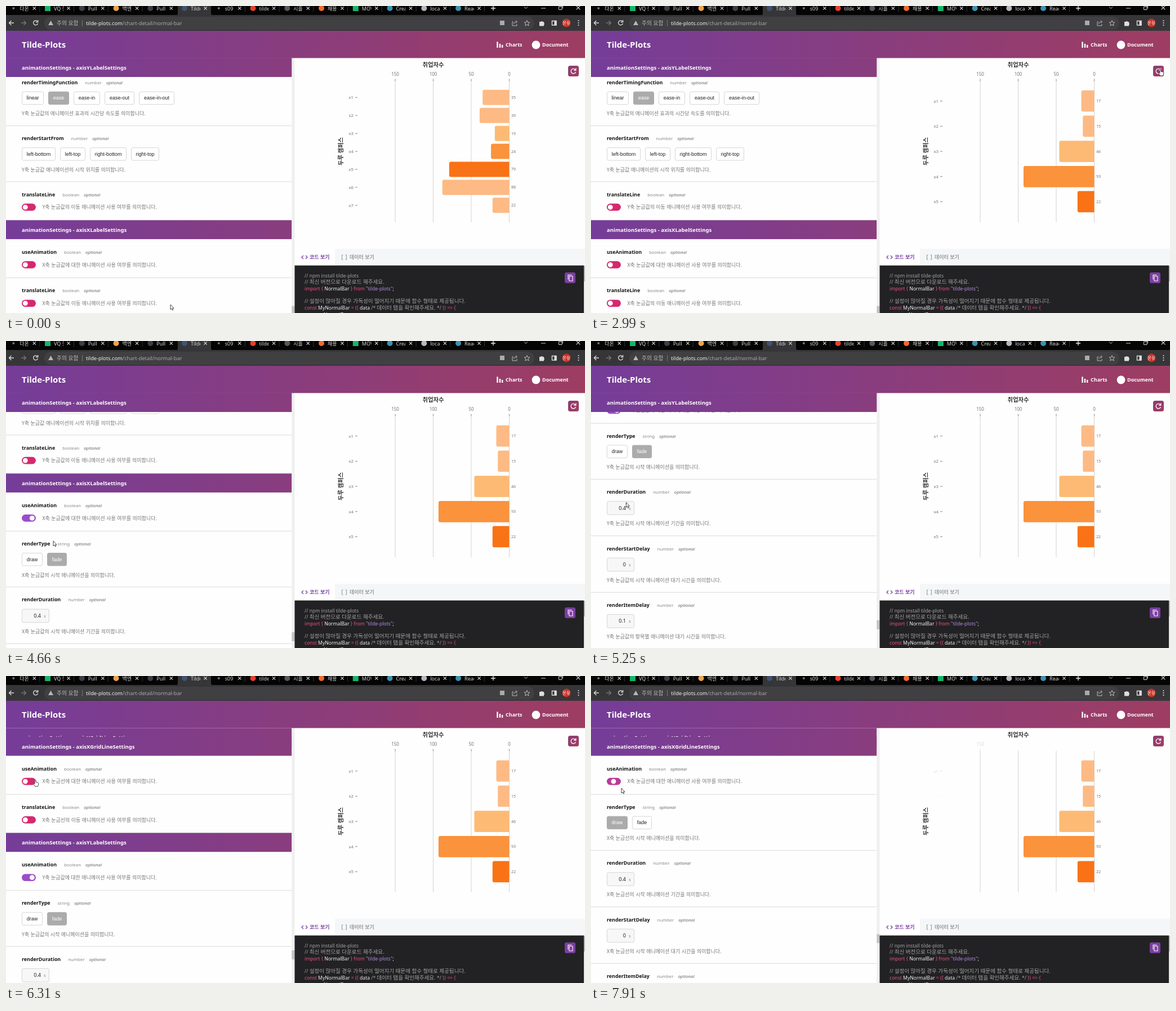
These frames come from a looping animation (1028 px wide and 545 px high, 7.99 s). An HTML page:

```html
<!DOCTYPE html>
<html lang="ko">
<head>
<meta charset="utf-8">
<title>Chart settings</title>
<style>
html, body { margin: 0; width: 100%; height: 100%; overflow: hidden; background: #fff; }
svg { display: block; width: 1028px; height: 545px; }
text { font-family: "Noto Sans", "Noto Sans CJK KR", "Noto Sans CJK", sans-serif; font-size: 9px; white-space: pre; }
.bold { font-weight: 700; }
.head { font-size: 9.52px; font-weight: 700; fill: #fff; }
.label { font-size: 8.87px; font-weight: 700; fill: #151515; }
.type { font-size: 7.85px; font-weight: 400; fill: #888; }
.opt { font-size: 7.85px; font-weight: 400; font-style: italic; fill: #666; }
.desc { font-family: "Noto Sans CJK KR", "Noto Sans CJK", sans-serif; font-size: 8.95px; fill: #777; }
.btn { font-family: "Liberation Sans", Arial, sans-serif; text-anchor: middle; fill: #222; }
.code { font-size: 8.6px; fill: #eee; }
.ko { font-size: 9.55px; }
.tick { font-size: 8px; fill: #777; }
.small { font-size: 7.2px; fill: #777; }
</style>
</head>
<body>
<svg id="stage" viewBox="0 0 1028 545">
  <defs>
    <linearGradient id="brand" gradientUnits="userSpaceOnUse" x1="0" y1="0" x2="1028" y2="0">
      <stop stop-color="#753d99"/><stop offset="1" stop-color="#9e3d62"/>
    </linearGradient>
    <linearGradient id="refresh" x2="1" y2="1">
      <stop stop-color="#8a3d74"/><stop offset="1" stop-color="#a53d5c"/>
    </linearGradient>
    <clipPath id="panelClip"><rect y="92" width="508" height="453"/></clipPath>
  </defs>
</svg>
<script>
const DURATION = 7990;
const stage = document.getElementById('stage');

function el(parent, tag, attrs = {}) {
  const node = document.createElementNS('http://www.w3.org/2000/svg', tag);
  for (const key in attrs) node.setAttribute(key, attrs[key]);
  return parent.appendChild(node);
}
const group = (parent, attrs) => el(parent, 'g', attrs);
const rect = (parent, x, y, width, height, fill, more) =>
  el(parent, 'rect', { x, y, width, height, fill, ...more });
const circle = (parent, cx, cy, r, fill, more) => el(parent, 'circle', { cx, cy, r, fill, ...more });
const path = (parent, d, stroke, width = 1, more) =>
  el(parent, 'path', { d, stroke, 'stroke-width': width, fill: 'none', ...more });
function text(parent, x, y, content, cls, more) {
  const node = el(parent, 'text', { x, y, class: cls, ...more });
  node.textContent = content;
  return node;
}
function span(parent, content, cls, more) {
  const node = el(parent, 'tspan', { class: cls, ...more });
  node.textContent = content;
}

const clamp = v => Math.max(0, Math.min(1, v));
const smooth = v => v * v * (3 - 2 * v);

// Eased values between keys of the form [time, value, value, ...]
function sample(keys, t) {
  let i = 0;
  while (i < keys.length - 1 && keys[i + 1][0] <= t) i++;
  const a = keys[i], b = keys[i + 1] || a;
  const k = a === b ? 0 : smooth(clamp((t - a[0]) / (b[0] - a[0])));
  return a.map((v, n) => typeof v === 'number' ? v + (b[n] - v) * k : v);
}

// ---------- browser frame ----------
function drawBrowser() {
  rect(stage, 0, 0, 1028, 17, '#050505');
  rect(stage, 0, 16, 1028, 28, '#363638');
  path(stage, 'M303 17 Q305 16 305 12 V0 H364 V12 Q364 16 367 17 Z', 'none', 0, { fill: '#363638' });
  const tabs = [
    ['#777', '다온', 2], ['#12b76a', 'VQ 등'], ['#3a3f45', 'Pull'], ['#f0a24a', '백엔'], ['#3a3f45', 'Pull'],
    ['#3f5374', 'Tilde'], ['#777', 's09', 2], ['#e8402a', 'tilde'], ['#55585f', '시흘'], ['#f06a2a', '채용'],
    ['#12b76a', 'MOV'], ['#3b93b0', 'Crea'], ['#b5b8bc', 'loca'], ['#3b93b0', 'Reac']
  ];
  tabs.forEach(([color, name, r = 5], i) => {
    const x = 13.3 + i * 60.75;
    if (color === '#12b76a') rect(stage, x - 5, -1, 10, 10, color);
    else circle(stage, x, 4, r, color);
    text(stage, x + 11, 7.5, name, '', { fill: '#d5d5d5' });
    rect(stage, x + 28, 0, 6, 12, i === 5 ? '#363638' : '#050505');
    cross(x + 37, 4, 2.6);
    if (i < 4 || i > 5) rect(stage, x + 46, 0, 1, 10, '#333');
  });
  path(stage, 'M861 4 H869 M865 0 V8', '#eee', 1.3);
  path(stage, 'M920 1.5 L923 4.5 L926 1.5', '#ccc');
  path(stage, 'M950 4 H958 M981.5 1 H987 V6.5 H981.5 Z M983.5 0 H988.5 V4.5', '#ccc');
  cross(1016, 3, 3.4);

  path(stage, 'M14 30 H5.5 M9.5 26 L5.5 30 L9.5 34', '#ddd', 1.3);
  path(stage, 'M27 30 H35.5 M31.5 26 L35.5 30 L31.5 34', '#777', 1.3);
  path(stage, 'M55.5 27 A4 4 0 1 0 56.5 31 M56.7 25 V28.5 H53', '#ddd', 1.3);
  rect(stage, 68, 19, 870, 23, '#404043', { rx: 11.5 });
  path(stage, 'M79.5 26 L84 34 H75 Z', 'none', 0, { fill: '#b8b8b8' });
  text(stage, 90, 33.5, '주의 요함', '', { fill: '#b8b8b8', style: 'font-size:9.8px' });
  rect(stage, 135, 25, 1, 11, '#777');
  const url = text(stage, 142, 33.5, '', '', { style: 'font-size:9.28px' });
  span(url, 'tilde-plots.com', '', { fill: '#f0f0f0' });
  span(url, '/chart-detail/normal-bar', '', { fill: '#a8a8a8' });
  rect(stage, 877, 26, 8, 8, '#a9abad');
  path(stage, 'M901 28 H899 V35 H907 V32 M901.5 32 Q902 28 907 28 M905 25.5 L907.5 28 L905 30.5', '#bbb');
  path(stage, 'M925 25.5 L926.4 28.9 L930 29.1 L927.2 31.4 L928.2 35 L925 33 L921.8 35 L922.8 31.4 L920 29.1 L923.6 28.9 Z', '#bbb');
  path(stage, 'M947 28 H949.5 A2 2 0 0 1 953 28 H955 V30 A2 2 0 0 1 955 33.5 V35.5 H947 Z', 'none', 0, { fill: '#ddd' });
  path(stage, 'M969.5 26.5 H977 V34 H969.5 Z', '#ddd', 1.4);
  rect(stage, 973.5, 26, 4, 8.5, '#ddd');
  circle(stage, 995, 30, 7.5, '#c83228');
  text(stage, 995, 33, '온유', '', { fill: '#fff', 'text-anchor': 'middle', style: 'font-size:7.5px' });
  [26, 30, 34].forEach(y => circle(stage, 1016.5, y, 1.1, '#ddd'));

  rect(stage, 0, 44, 1028, 49, 'url(#brand)');
  text(stage, 28, 74, 'Tilde-Plots', 'bold', { fill: '#fff', style: 'font-size:15px' });
  path(stage, 'M872.5 63.5 V74 M877 67 V74 M881.2 69 V74', '#fff', 2.4);
  text(stage, 887, 71.5, 'Charts', 'bold', { fill: '#fff' });
  circle(stage, 941, 69, 7.4, '#fff');
  text(stage, 952, 71.5, 'Document', 'bold', { fill: '#fff' });
}
function cross(x, y, r) {
  path(stage, `M${x - r} ${y - r} L${x + r} ${y + r} M${x + r} ${y - r} L${x - r} ${y + r}`, '#ddd', 1.1);
}

// ---------- settings panel ----------
const PANEL_TOP = 92.4;
const rows = [];
const toggles = {};
let rowLayer, headLayer, thumb;

function header(name) {
  const g = group(headLayer);
  rect(g, 0, 0, 507.4, 33.6, 'url(#brand)');
  text(g, 28, 20.7, `animationSettings - ${name}Settings`, 'head');
  rows.push({ g, height: 34, sticky: true });
}
function row(name, type, height, section) {
  const g = group(rowLayer);
  const label = text(g, 28, 25.6, '', 'label');
  span(label, name);
  span(label, type, 'type', { dx: 13 });
  span(label, 'optional', 'opt', { dx: 8 });
  rect(g, 0, height - 0.6, 507.4, 1, '#dadada');
  rows.push({ g, height, section });
  return g;
}
function toggleRow(name, key, desc) {
  const g = row(name, 'boolean', 68.3);
  const track = rect(g, 28, 38.8, 25, 12.6, '#d6286f', { rx: 6.3 });
  const knob = circle(g, 34.3, 45.1, 4.4, '#fff');
  text(g, 64.5, 48.3, desc, 'desc');
  toggles[key] = { track, knob };
}
function choiceRow(name, type, options, selected, desc, section) {
  const g = row(name, type, 99.3, section);
  let x = 28.5;
  options.forEach(([option, width]) => {
    const on = option === selected;
    rect(g, x, 38.9, width - 1, 22.4, on ? '#ababab' : '#fff', { rx: 2.5, stroke: on ? '#ababab' : '#d6d6d6' });
    text(g, x + (width - 1) / 2, 53, option, 'btn', on ? { style: 'fill:#fff' } : {});
    x += width + 8;
  });
  text(g, 28, 81, desc, 'desc');
}
function numberRow(name, value, desc, section) {
  const g = row(name, 'number', 100.4, section);
  rect(g, 28.5, 39.2, 48, 23.6, '#f7f7f7', { rx: 2.5, stroke: '#d6d6d6' });
  text(g, 62, 54, value, '', { fill: '#222', 'text-anchor': 'end' });
  text(g, 67, 54, 's', 'type');
  text(g, 28, 81.8, desc, 'desc');
}
function section(axis, part, noun, renderType) {
  const key = axis + part, subject = `${axis}축 ${noun}`, end = ' 의미합니다.';
  header(`axis${key}`);
  toggleRow('useAnimation', key, `${subject}에 대한 애니메이션 사용 여부를${end}`);
  if (renderType) {
    choiceRow('renderType', 'string', [['draw', 37], ['fade', 35]], renderType, `${subject}의 시작 애니메이션을${end}`, key);
    numberRow('renderDuration', '0.4', `${subject}의 시작 애니메이션 기간을${end}`, key);
    numberRow('renderStartDelay', '0', `${subject}의 시작 애니메이션 대기 시간을${end}`, key);
    numberRow('renderItemDelay', '0.1', `${subject}의 항목별 애니메이션 대기 시간을${end}`, key);
    choiceRow('renderTimingFunction', 'number',
      [['linear', 39], ['ease', 37], ['ease-in', 47], ['ease-out', 53], ['ease-in-out', 63]],
      'ease', `${subject}의 애니메이션 효과의 시간당 속도를${end}`, key);
    choiceRow('renderStartFrom', 'number',
      [['left-bottom', 60], ['left-top', 45], ['right-bottom', 65], ['right-top', 50]],
      '', `${subject} 애니메이션의 시작 위치를${end}`, key);
  }
  toggleRow('translateLine', key + 'Move', `${subject}의 이동 애니메이션 사용 여부를${end}`);
}
function drawPanel() {
  rect(stage, 0, PANEL_TOP, 508, 453, '#fefefe');
  const panel = group(stage, { 'clip-path': 'url(#panelClip)' });
  rowLayer = group(panel);
  headLayer = group(panel);
  section('Y', 'GridLine', '눈금선');
  section('X', 'GridLine', '눈금선', 'draw');
  section('Y', 'Label', '눈금값', 'fade');
  section('X', 'Label', '눈금값', 'fade');
  rect(stage, 507.4, PANEL_TOP, 5.6, 453, '#efefef');
  thumb = rect(stage, 507.4, 0, 5.2, 16, '#c3c3c3');
}
function setToggle(key, k) {
  const { track, knob } = toggles[key];
  const mix = (a, b) => Math.round(a + (b - a) * k);
  track.setAttribute('fill', `rgb(${mix(214, 155)},${mix(40, 77)},${mix(111, 202)})`);
  knob.setAttribute('cx', 34.3 + 12 * k);
}

// ---------- chart and code ----------
const BAR_COLORS = ['#fdba84', '#fdba84', '#fdba74', '#fb923c', '#f97316', '#fdba84', '#fdba84'];
const DATASETS = [
  [35, 39, 19, 24, 79, 88, 22],
  [46, 46, 57, 62, 81, 31],
  [38, 27, 61, 74, 45],
  [17, 15, 46, 93, 22]
];
const charts = [], axisLabels = [];

function drawChart() {
  rect(stage, 512.5, PANEL_TOP, 515.5, 339, '#fefefe');
  text(stage, 758.5, 107.5, '취업자수', 'bold', { fill: '#333', 'text-anchor': 'middle', style: 'font-size:10.3px' });
  text(stage, 0, 0, '두루 캠퍼스', 'bold', {
    fill: '#333', 'text-anchor': 'middle', style: 'font-size:10.3px', transform: 'translate(598 258) rotate(-90)'
  });
  [150, 100, 50, 0].forEach((value, i) => {
    const x = 691 + i * 67.5;
    rect(stage, x - 0.5, 133, 1, 251, '#d3d3d3');
    const g = group(stage);
    text(g, x, 124.3, value, 'tick', { 'text-anchor': 'middle' });
    rect(g, x - 0.5, 129.5, 1, 4, '#888');
    axisLabels.push(g);
  });
  DATASETS.forEach(values => {
    const g = group(stage), pitch = 223.4 / values.length, labels = [];
    values.forEach((value, i) => {
      const y = 146.4 + pitch * (i + 0.5), h = pitch * 0.845, w = value * 1.35;
      path(g, `M893.5 ${y - h / 2} h${3 - w} q-3 0 -3 3 v${h - 6} q0 3 3 3 h${w - 3} Z`, 'none', 0, { fill: BAR_COLORS[i] });
      text(g, 897, y + 2.4, value, 'small');
      const label = group(g);
      text(label, 617, y + 3, `x${i + 1}`, 'small', { 'text-anchor': 'end', style: 'font-size:7.7px' });
      rect(label, 620, y - 0.5, 4, 1, '#888');
      labels.push(label);
    });
    charts.push({ g, labels });
  });
  rect(stage, 998, 106, 19, 19, 'url(#refresh)', { rx: 3.5 });
  path(stage, 'M1010.8 113 A4.3 4.3 0 1 0 1011.5 117 M1011.8 110.5 V114 H1008.3', '#fff', 1.3);
}
function drawCode() {
  rect(stage, 512.5, 431, 515.5, 30, '#f5f6f8');
  rect(stage, 512.5, 431, 71.5, 30, '#fff');
  path(stage, 'M528 443 L525 446 L528 449 M532 443 L535 446 L532 449', '#7b3fa0', 1.3);
  text(stage, 539, 449, '코드 보기', 'bold', { fill: '#7b3fa0' });
  path(stage, 'M598.5 442 H596.5 V450 H598.5 M602.5 442 H604.5 V450 H602.5', '#999', 1.1);
  text(stage, 610, 449, '데이터 보기', 'bold', { fill: '#999' });
  rect(stage, 512.5, 460.6, 513.5, 85, '#222224');
  rect(stage, 1026, 461, 2, 84, '#e8e8e8');
  rect(stage, 1026, 461, 2, 28, '#bbb');

  const pink = '#ee4f86', violet = '#b48be0', gray = '#a3a3a3';
  const line = (x, y, parts) => {
    const node = text(stage, x, y, '', 'code');
    parts.forEach(([s, fill, cls = '']) => span(node, s, cls, { style: `fill:${fill}` }));
  };
  line(530, 482, [['// npm install tilde-plots', gray]]);
  line(530, 493.3, [['// ', gray], ['최신 버전으로 다운로드 해주세요.', gray, 'ko']]);
  line(530, 504.6, [['import', pink], [' { ', pink], ['NormalBar', '#eee'], [' } ', pink], ['from ', pink], ['"tilde-plots"', violet], [';', '#eee']]);
  line(530, 527.3, [['// ', gray], ['설정이 많아질 경우 가독성이 떨어지기 때문에 함수 형태로 제공됩니다.', gray, 'ko']]);
  line(530, 539, [['const ', pink], ['MyNormalBar ', '#eee'], ['= ', pink], ['({ ', pink], ['data ', '#eee'], ['/* ', gray],
    ['데이터 탭을 확인해주세요.', gray, 'ko'], [' */ ', gray], ['}) => {', pink]]);
  line(559, 550.5, [['<', pink], ['NormalBar', '#eee']]);

  rect(stage, 992, 473, 19, 19, '#7b3fa0', { rx: 3 });
  path(stage, 'M998 485.5 V477.5 H1004.5 M1000 479.8 H1006 V488 H1000 Z', '#fff', 1.1);
}

// ---------- cursor ----------
const cursors = {};
function drawCursors() {
  const shape = (d, fill, stroke, width = 0.9) => {
    const g = group(stage);
    path(g, d, stroke, width, { fill, 'stroke-linejoin': 'round' });
    return g;
  };
  cursors.arrow = shape('M0 0 V9 L2 7.2 L3.5 10 L4.8 9.4 L3.5 6.6 H6 Z', '#fff', '#333');
  cursors.hand = shape('M0 1 Q1 -0.6 2 1 V4.3 Q6.5 4.4 6.8 6.5 Q6.8 10 5.4 12 H0.6 Q-0.8 9 -2.8 7.4 Q-2.4 6 0 7.4 Z', '#fff', '#333');
  cursors.beam = shape('M-1.5 0 H1.5 M0 0 V9 M-1.5 9 H1.5', 'none', '#ddd', 0.9);
}

// ---------- motion ----------
const CURSOR = [
  [0, 292, 530, 'arrow'], [460, 292, 530, 'arrow'], [1190, 1010, 112, 'hand'], [2990, 1010, 112, 'hand'],
  [3060, 1004, 118, 'arrow'], [3660, 50, 461, 'hand'], [3790, 50, 461, 'hand'], [3860, 48, 463, 'hand'],
  [4280, 48, 463, 'arrow'], [4620, 84, 355, 'arrow'], [4920, 84, 355, 'arrow'], [5400, 56, 266, 'beam'],
  [5720, 56, 266, 'arrow'], [6200, 51, 184, 'hand'], [6450, 51, 184, 'hand'], [6780, 45, 264, 'hand'],
  [7050, 45, 264, 'hand'], [7650, 50, 184, 'hand'], [7800, 50, 184, 'arrow'], [7910, 54, 199, 'arrow']
];
const SCROLL = [[0, 653], [4230, 653], [4620, 798], [4900, 798], [5430, 11], [5720, 11], [5980, -15]];
// Each redraw: time, dataset, delay between labels, fade time, whether the value axis fades too
const REDRAWS = [
  [-9999, 0, 0, 1, false], [1260, 1, 8, 150, false], [1850, 2, 40, 180, false],
  [2390, 3, 40, 150, false], [4060, 3, 70, 250, true], [7800, 3, 80, 260, true]
];
const X_LABEL_ON = 4060, X_GRID_ON = 7800;

function layoutPanel(t) {
  const open = { YLabel: true, XLabel: t >= X_LABEL_ON, XGridLine: t >= X_GRID_ON };
  const scroll = sample(SCROLL, t)[1];
  let y = 93 - scroll - 170.6;
  for (const r of rows) {
    const shown = !r.section || open[r.section];
    r.g.style.display = shown ? '' : 'none';
    if (!shown) continue;
    r.g.setAttribute('transform', `translate(0 ${r.sticky ? Math.max(PANEL_TOP, y) : y})`);
    y += r.height;
  }
  const total = 11680 + (open.XLabel ? 587 : 0) + (open.XGridLine ? 970 : 0);
  thumb.setAttribute('y', 93 + 452 * (scroll + 10709) / total);
  setToggle('YLabel', 1);
  setToggle('XLabel', smooth(clamp((t - X_LABEL_ON) / 220)));
  setToggle('XGridLine', smooth(clamp((t - X_GRID_ON) / 230)));
}
function updateChart(t) {
  const [start, index, delay, fade, both] = REDRAWS.filter(r => r[0] <= t).pop();
  const reveal = (node, i) => {
    node.style.opacity = clamp((t - start - i * delay) / fade) ** 1.6;
  };
  charts.forEach(({ g }, i) => { g.style.display = i === index ? '' : 'none'; });
  charts[index].labels.forEach(reveal);
  axisLabels.forEach((node, i) => both ? reveal(node, i) : node.style.opacity = 1);
}
function moveCursor(t) {
  const [, x, y, kind] = sample(CURSOR, t);
  for (const name in cursors) cursors[name].style.display = name === kind ? '' : 'none';
  cursors[kind].setAttribute('transform', `translate(${x} ${y})`);
}
function render(t) {
  layoutPanel(t);
  updateChart(t);
  moveCursor(t);
}

drawBrowser();
drawPanel();
drawChart();
drawCode();
drawCursors();

const begin = performance.now();
function tick() {
  render((performance.now() - begin) % DURATION);
  requestAnimationFrame(tick);
}
tick();
</script>
</body>
</html>
```
